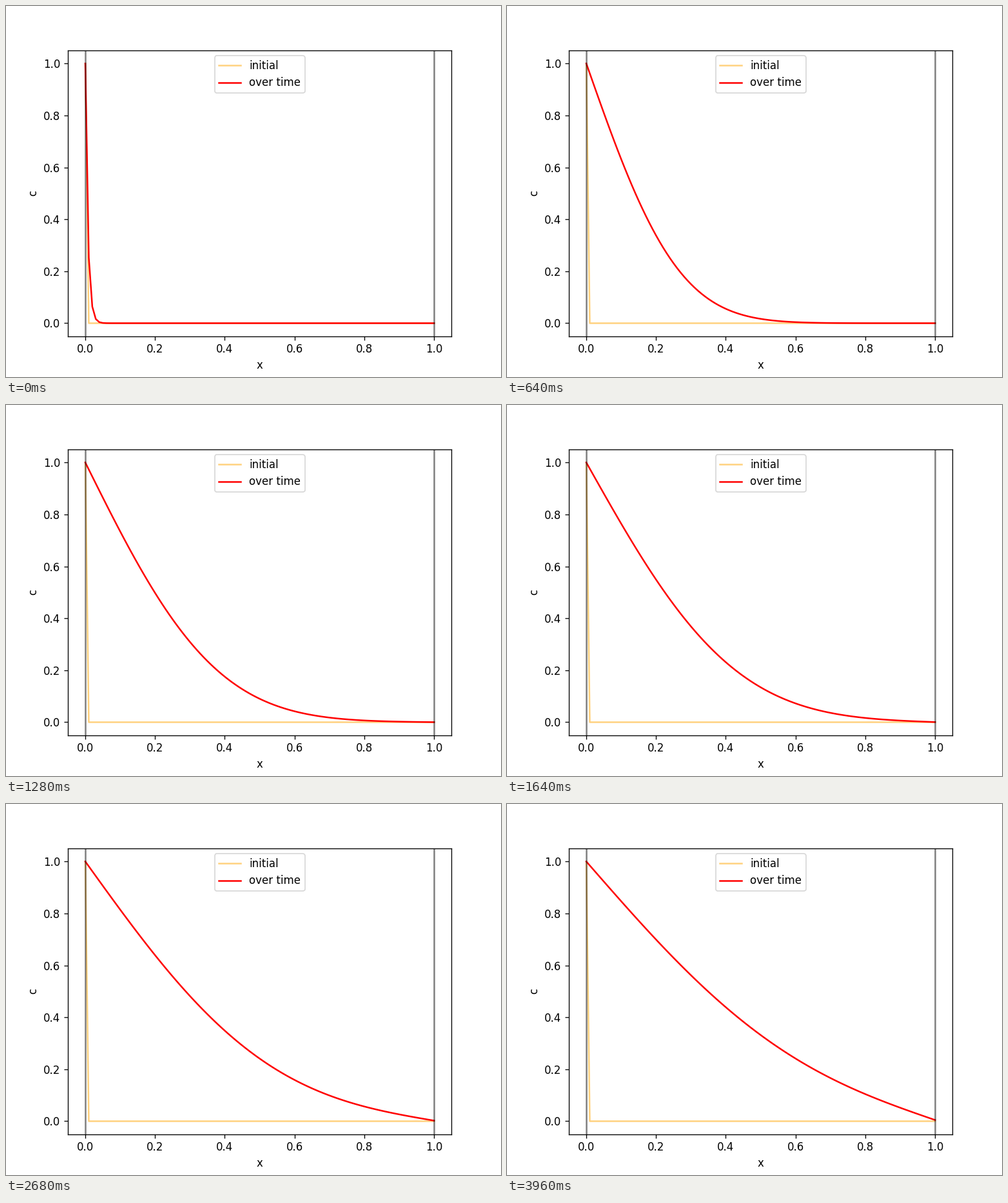
A matplotlib script for the animation above (4 s loop, 768 px wide and 576 px high).

```python
import numpy as np
import matplotlib.pyplot as plt
from matplotlib.animation import FuncAnimation

N = 101          # grid points on [0, 1]
R = 0.453        # D * dt / dx**2
FRAMES = 100
SUBSTEPS = 30    # implicit steps per frame


def step_matrix():
    """Backward Euler diffusion step; left value held, zero one cell past the right end."""
    a = (1 + 2 * R) * np.eye(N) - R * (np.eye(N, k=1) + np.eye(N, k=-1))
    a[0] = 0
    a[0, 0] = 1
    return np.linalg.inv(a)


x = np.linspace(0, 1, N)
start = np.zeros(N)
start[0] = 1

step = step_matrix()
leap = np.linalg.matrix_power(step, SUBSTEPS)
profiles = [step @ start]
for _ in range(FRAMES - 1):
    profiles.append(leap @ profiles[-1])

fig, ax = plt.subplots(figsize=(6.4, 4.8), dpi=120)
ax.plot(x, start, color="orange", alpha=0.5, label="initial")
curve, = ax.plot(x, profiles[0], color="red", label="over time")
for wall in (0, 1):
    ax.axvline(wall, color="black", alpha=0.5)
ax.set_xlim(-0.05, 1.05)
ax.set_ylim(-0.05, 1.05)
ax.set_xlabel("x")
ax.set_ylabel("c")
ax.legend(loc="upper center")


def update(i):
    curve.set_ydata(profiles[i])
    return curve,


anim = FuncAnimation(fig, update, frames=FRAMES, interval=40, repeat=True)
plt.show()
```
